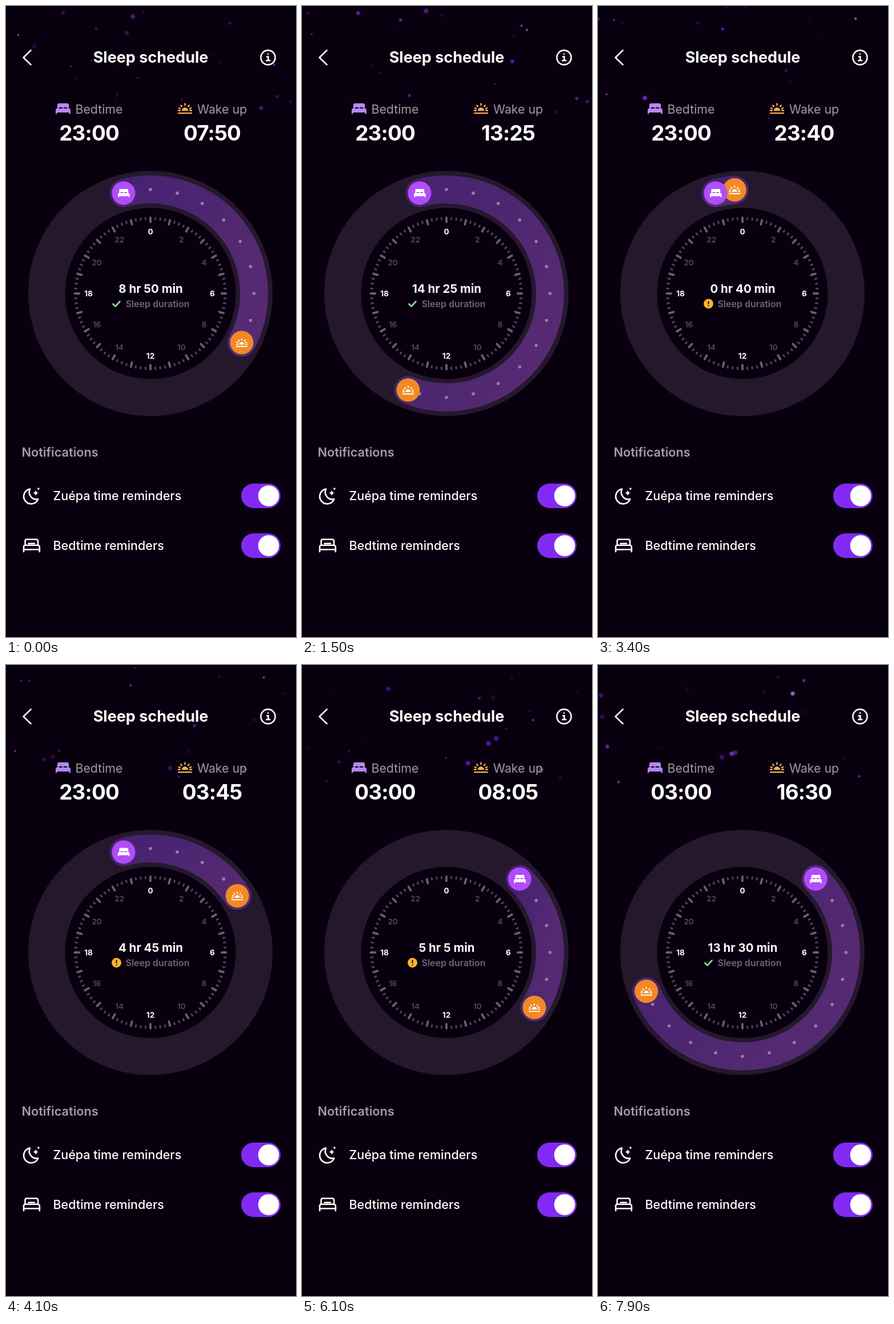
These frames come from a looping animation (508 px wide and 1102 px high, 8 s). An HTML page:

```html
<!DOCTYPE html>
<html lang="en">
<head>
<meta charset="utf-8">
<title>Sleep schedule</title>
<style>
  html, body { margin: 0; width: 100%; height: 100%; overflow: hidden; background: #09000f; }
  svg { display: block; width: 100%; height: 100%; }
  text { font-family: Inter, "Open Sans", sans-serif; fill: #fff; }
  .mid { text-anchor: middle; }
  .title { font-size: 27px; font-weight: 700; }
  .label { font-size: 21.3px; fill: #a09ba4; }
  .time { font-size: 36.8px; font-weight: 700; letter-spacing: -.8px; }
  .duration { font-size: 20.5px; font-weight: 650; }
  .caption { font-size: 16px; font-weight: 600; fill: #6e6676; }
  .heading { font-size: 21.7px; font-weight: 600; fill: #a39da5; }
  .row { font-size: 21.5px; font-weight: 550; }
  .hour { font-size: 13.5px; font-weight: 600; fill: #524a59; }
  .hour.main { font-weight: 700; fill: #fff; }
  .line { fill: none; stroke: #fff; stroke-width: 2.6; stroke-linecap: round; stroke-linejoin: round; }
</style>
</head>
<body>
<svg viewBox="0 0 508 1102" preserveAspectRatio="none">
  <defs id="defs">
    <linearGradient id="sleep" x1="0" y1="0" x2="1" y2=".6">
      <stop stop-color="#46226f"/><stop offset="1" stop-color="#552a72"/>
    </linearGradient>
    <path id="bed" d="M-10 0V-7Q-10-9.5-7.5-9.5H7.5Q10-9.5 10-7V0H7.5V-1Q7.5-2.4 6.1-2.4H2.2Q.8-2.4.8-1V0H-.8V-1Q-.8-2.4-2.2-2.4H-6.1Q-7.5-2.4-7.5-1V0Z
      M-13 9V3Q-13-.4-10.5-.4H10.5Q13-.4 13 3V9H10.6V6.6H-10.6V9Z"/>
    <g id="sun">
      <path d="M-5.6 3.6a5.6 5.6 0 0 1 11.2 0z"/>
      <path d="M-11.5 3.2h3M8.5 3.2h3M-11.5 7.8h23M0-6v-2.5M-5.7-3.8l-1.5-1.9M5.7-3.8l1.5-1.9M-8.6-.3l-2-.7M8.6-.3l2-.7"
        fill="none" stroke="currentColor" stroke-width="2.4" stroke-linecap="round"/>
    </g>
    <g id="toggle">
      <rect width="69" height="43" rx="21.5" fill="#812af3"/>
      <circle cx="48" cy="21.5" r="18.3" fill="#fff"/>
    </g>
  </defs>

  <rect width="508" height="1102" fill="#09000f"/>
  <g id="stars"></g>

  <path class="line" d="M43.5 77.5L30.5 90L43.5 102.5"/>
  <text class="title mid" x="253.5" y="99">Sleep schedule</text>
  <circle class="line" cx="459" cy="90" r="12.6"/>
  <path class="line" d="M457 88.5h2.4v6.5M456.3 95.3h6M459 83.8v.2"/>

  <use href="#bed" x="100" y="179.5" fill="#b687f3"/>
  <text class="label" x="121.5" y="188">Bedtime</text>
  <text class="time mid" id="bedTime" x="145.6" y="235"></text>
  <use href="#sun" x="313.5" y="179.3" fill="#fbae58" color="#fbae58"/>
  <text class="label" x="335" y="188">Wake up</text>
  <text class="time mid" id="wakeTime" x="361" y="235"></text>

  <g transform="translate(253 502)">
    <circle r="181.8" fill="none" stroke="#25182d" stroke-width="64.5"/>
    <path id="arc" fill="none" stroke="url(#sleep)" stroke-width="49" stroke-linecap="round"/>
    <g id="dots" fill="#9a7bac"></g>
    <g id="ticks" stroke-linecap="round"></g>
    <g id="hours" class="mid"></g>
    <g id="wakeHandle">
      <circle r="20.5" fill="#f18a25"/>
      <use href="#sun" transform="translate(0 .5) scale(.81)" fill="#fff" color="#fff"/>
    </g>
    <g id="bedHandle">
      <circle r="20.5" fill="#b14cfb"/>
      <use href="#bed" transform="translate(.3 .3) scale(.79)" fill="#fff"/>
    </g>
  </g>

  <text class="duration mid" id="duration" x="253.5" y="501"></text>
  <path id="check" class="line" style="stroke:#8ee39b" d="M187.5 520.5L191.5 524.7L199.5 516"/>
  <g id="warning">
    <circle cx="193.5" cy="520" r="8.4" fill="#fab42f"/>
    <path d="M193.5 516v4.4M193.5 523.7v.1" stroke="#1c0d18" stroke-width="2" stroke-linecap="round"/>
  </g>
  <text class="caption" x="209.5" y="526">Sleep duration</text>

  <text class="heading" x="27.5" y="787">Notifications</text>
  <path class="line" d="M42 843.6A13 13 0 1 0 56.2 861.2A12.5 12.5 0 0 1 42 843.6Z"/>
  <path fill="#fff" d="M52 845.5q.8 4.2 5 5q-4.2.8-5 5q-.8-4.2-5-5q4.2-.8 5-5zM56.8 840.3q.4 2.4 2.8 2.8q-2.4.4-2.8 2.8q-.4-2.4-2.8-2.8q2.4-.4 2.8-2.8z"/>
  <text class="row" x="82.5" y="863">Zuépa time reminders</text>
  <use href="#toggle" x="412" y="834"/>
  <path class="line" d="M33.5 941.5V934.5Q33.5 931.5 36.5 931.5H53Q56 931.5 56 934.5V941.5M39.5 938.8H50
    M31 953V945Q31 941.8 34 941.8H55.5Q58.8 941.8 58.8 945V953M31 949.2H58.8"/>
  <text class="row" x="82.5" y="950">Bedtime reminders</text>
  <use href="#toggle" x="412" y="921"/>
</svg>

<script>
const LOOP = 8000, RADIUS = 181.5;
const $ = id => document.getElementById(id);

// Keys are [ms, hours]; hours keep counting past midnight.
const bedKeys = [[0, 23], [5150, 23], [5600, 25.2], [6000, 27], [8000, 27]];
const wakeKeys = [[0, 7.88], [250, 8.05], [1500, 13.44], [2500, 22.94], [2900, 23.5],
  [3400, 23.71], [3650, 24.1], [4200, 28.6], [4800, 32.13], [6400, 32.13], [7200, 37], [7900, 40.54], [8000, 40.6]];

function add(parent, tag, attributes) {
  const node = document.createElementNS("http://www.w3.org/2000/svg", tag);
  for (const name in attributes) node.setAttribute(name, attributes[name]);
  return parent.appendChild(node);
}

function polar(hour, radius = RADIUS) {
  const angle = hour * Math.PI / 12;
  return [radius * Math.sin(angle), -radius * Math.cos(angle)];
}

// Monotone cubic interpolation: smooth drags that never overshoot.
function follow(keys, t) {
  let i = 0;
  while (i < keys.length - 2 && t >= keys[i + 1][0]) i++;
  const slope = k => k < 0 || k > keys.length - 2 ? 0
    : (keys[k + 1][1] - keys[k][1]) / (keys[k + 1][0] - keys[k][0]);
  const tangent = k => {
    const a = slope(k - 1), b = slope(k);
    return a * b > 0 ? 2 * a * b / (a + b) : 0;
  };
  const [t0, a] = keys[i], [t1, b] = keys[i + 1], span = t1 - t0;
  const u = (t - t0) / span, v = 1 - u;
  return a * v * v * (1 + 2 * u) + b * u * u * (3 - 2 * u)
    + span * u * v * (tangent(i) * v - tangent(i + 1) * u);
}

const random = seed => {
  const x = Math.sin(seed * 127.1 + 11.7) * 43758.5453;
  return x - Math.floor(x);
};

for (let i = 0; i < 96; i++) {
  const major = i % 4 === 0;
  const [x1, y1] = polar(i / 4, major ? 124.8 : 129.5), [x2, y2] = polar(i / 4, 132.5);
  add($("ticks"), "line", { x1, y1, x2, y2, stroke: major ? "#68616c" : "#514957", "stroke-width": major ? 3.8 : 2.8 });
}
for (let hour = 0; hour < 24; hour += 2) {
  const [x, y] = polar(hour, 108.5);
  add($("hours"), "text", { x, y: y + 5, class: hour % 6 ? "hour" : "hour main" }).textContent = hour;
}
const dots = Array.from({ length: 24 }, (_, hour) => {
  const [cx, cy] = polar(hour);
  return add($("dots"), "circle", { cx, cy, r: 2.8 });
});

const starColors = ["#7c22f2", "#8a35ee", "#b070e0", "#5f24c0"];
starColors.forEach((color, i) => {
  const glow = add($("defs"), "radialGradient", { id: "glow" + i });
  [[0, 1], [.45, .9], [1, 0]].forEach(([offset, opacity]) =>
    add(glow, "stop", { offset, "stop-color": color, "stop-opacity": opacity }));
});
const stars = Array.from({ length: 24 }, () => add($("stars"), "circle", {}));

// Each star drifts, fades in and out, then reappears elsewhere.
function drawStars(t) {
  stars.forEach((star, i) => {
    const life = 2200 + 1800 * random(i + 1);
    const clock = t / life + random(i + 40), round = Math.floor(clock), u = clock - round;
    const pick = n => random(i * 13 + round * 5.3 + n * 101);
    star.setAttribute("cx", 508 * pick(1) + 40 * (pick(2) - .5) * u);
    star.setAttribute("cy", 205 * pick(3) ** 1.2 + 50 * (pick(4) - .5) * u);
    star.setAttribute("r", 1.4 + 4.6 * pick(5) ** 1.3);
    star.setAttribute("opacity", Math.sin(Math.PI * u) * (.4 + .6 * pick(6)));
    star.setAttribute("fill", `url(#glow${Math.floor(starColors.length * pick(7))})`);
  });
}

const mod = (value, size) => (value % size + size) % size;
const pad = n => String(n).padStart(2, "0");
const toMinutes = hours => Math.floor(hours * 12 + 1e-6) * 5;
const clockText = minutes => pad(Math.floor(mod(minutes, 1440) / 60)) + ":" + pad(mod(minutes, 60));

function draw(t) {
  const bed = follow(bedKeys, t), wake = follow(wakeKeys, t);
  const span = mod(wake - bed, 24);
  const bedMinutes = toMinutes(bed), wakeMinutes = toMinutes(wake);
  const minutes = mod(wakeMinutes - bedMinutes, 1440);
  const start = polar(bed), end = polar(wake);

  $("arc").setAttribute("d", `M${start}A${RADIUS} ${RADIUS} 0 ${span > 12 ? 1 : 0} 1 ${end}`);
  $("bedHandle").setAttribute("transform", `translate(${start})`);
  $("wakeHandle").setAttribute("transform", `translate(${end})`);
  dots.forEach((dot, hour) => dot.style.display = mod(hour - bed, 24) < span ? "" : "none");

  $("bedTime").textContent = clockText(bedMinutes);
  $("wakeTime").textContent = clockText(wakeMinutes);
  $("duration").textContent = `${Math.floor(minutes / 60)} hr ${minutes % 60} min`;
  const short = minutes < 420;
  $("check").style.display = short ? "none" : "";
  $("warning").style.display = short ? "" : "none";
  drawStars(t);
}

const began = performance.now();
function frame() {
  draw((performance.now() - began) % LOOP);
  requestAnimationFrame(frame);
}
frame();
</script>
</body>
</html>
```
